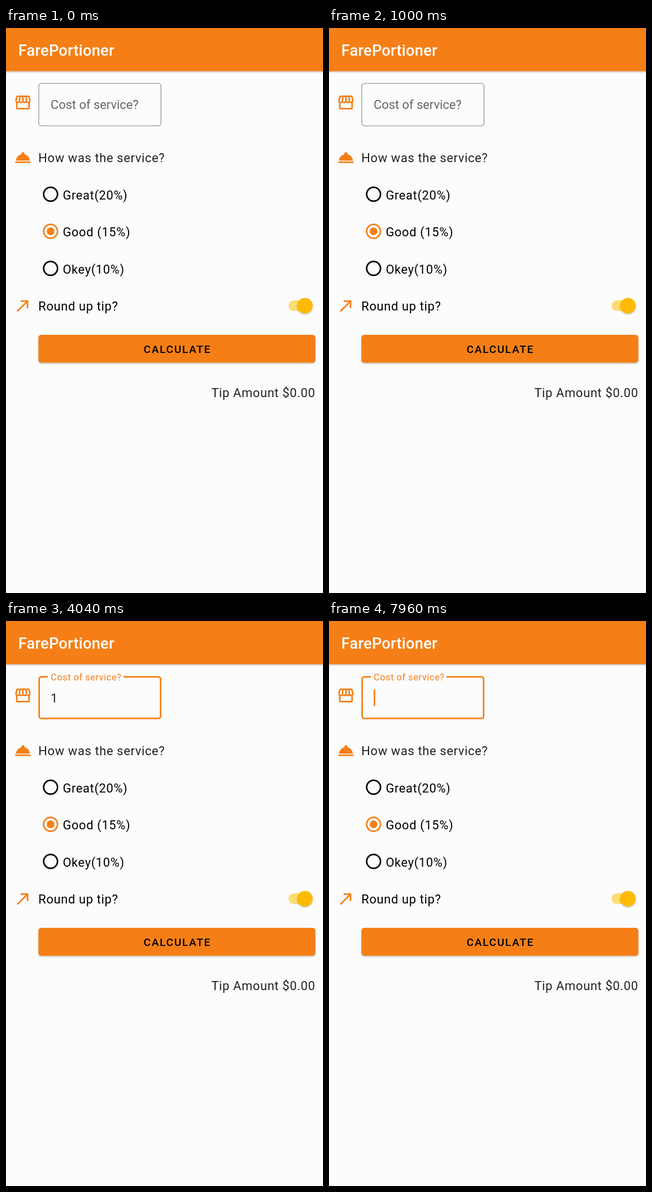
Recreate the animation shown at these times as an HTML page. Size 561x998 px, loop 8 s.

```html
<!DOCTYPE html>
<html lang="en">
<head>
<meta charset="utf-8">
<title>Tip form</title>
<style>
  html, body { margin: 0; width: 100%; height: 100%; overflow: hidden; background: #fcfcfd; }
  svg { display: block; width: 100%; height: 100%; }
  text { font: 400 21.82px Roboto, sans-serif; letter-spacing: .03125em; white-space: pre; }
  .title { font-size: 27.27px; font-weight: 500; letter-spacing: .0075em; fill: #fff; }
  .button { font-size: 19.09px; font-weight: 500; letter-spacing: .0893em; text-anchor: middle; }
  .soft { fill: #212121; }
  .icon { fill: #f57f17; }
  .line { fill: none; stroke: #f57f17; stroke-width: 2; }
</style>
</head>
<body>
<svg viewBox="0 0 561 998" preserveAspectRatio="none">
  <defs>
    <filter id="shadow" x="-20%" y="-20%" width="140%" height="150%">
      <feDropShadow dx="0" dy="1.5" stdDeviation="1.3" flood-color="#000" flood-opacity=".28"/>
    </filter>
  </defs>
  <rect width="561" height="998" fill="#fcfcfd"/>
  <rect x="-9" y="-9" width="579" height="85.3" fill="#f57f17" filter="url(#shadow)"/>
  <text class="title" x="21.8" y="49">FarePortioner</text>

  <g transform="translate(13.6 115.2) scale(1.3636)" class="line">
    <path d="M4 12V19a1 1 0 0 0 1 1H19a1 1 0 0 0 1-1V12"/>
    <path d="M3.07 9.1L4.1 4.75A1 1 0 0 1 5.05 4h13.9a1 1 0 0 1 .95.75L20.93 9.1A2.2 2.2 0 0 1 18.76 12 2.25 2.25 0 0 1 16.5 9.8 2.25 2.25 0 0 1 14.2 12 2.25 2.3 0 0 1 12 9.7 2.25 2.3 0 0 1 9.7 12 2.25 2.25 0 0 1 7.5 9.7 2.25 2.25 0 0 1 5.23 12 2.2 2.2 0 0 1 3.07 9.1ZM8.03 4L7.45 9.7M12 4V9.7M15.97 4l.56 5.7"/>
  </g>
  <path class="icon" transform="translate(13.6 212.5) scale(1.3636)" d="M2 17h20v2H2zm11.84-9.21c.1-.24.16-.51.16-.79a2 2 0 0 0-4 0c0 .28.06.55.16.79C6.25 8.6 3.27 11.93 3 16h18c-.27-4.07-3.25-7.4-7.16-8.21z"/>
  <path class="icon" transform="translate(13.6 474.2) scale(1.3636)" d="M9 5v2h6.59L4 18.59 5.41 20 17 8.41V15h2V5z"/>

  <path id="outline" fill="none"/>
  <text id="hint" x="79.1">Cost of service?</text>
  <text id="amount" class="soft" x="79.1" y="144">1</text>
  <rect id="cursor" y="121" width="2.7" height="29.5" fill="#f57f17"/>

  <text class="soft" x="57.3" y="237">How was the service?</text>
  <g id="options"></g>
  <text x="57.3" y="499">Round up tip?</text>

  <rect x="500" y="481" width="38" height="19" rx="9.5" fill="#fddd73"/>
  <circle cx="529" cy="490.5" r="13.8" fill="#fdba05" filter="url(#shadow)"/>

  <rect x="57.3" y="542" width="490.2" height="49.2" rx="5" fill="#f57f17" filter="url(#shadow)"/>
  <text class="button" x="303.3" y="574">CALCULATE</text>
  <text class="soft" x="363.4" y="651.5">Tip Amount $0.00</text>
</svg>
<script>
const LOOP = 8000, BLINK = 500;
const FOCUS = 3330, FLOAT_TIME = 167, TOUCH = 4920, ERASE = 5950;
const GREY = [101, 101, 104], ORANGE = [245, 127, 23];
const byId = id => document.getElementById(id);
const outline = byId('outline'), hint = byId('hint'), amount = byId('amount'), cursor = byId('cursor');
const lerp = (a, b, p) => a + (b - a) * p;
const mix = (a, b, p) => `rgb(${a.map((v, i) => Math.round(lerp(v, b[i], p)))})`;

function radio(label, y, checked) {
  const color = checked ? '#f57f17' : '#000';
  return `<circle cx="78.9" cy="${y}" r="12.27" fill="none" stroke="${color}" stroke-width="2.73"/>` +
    (checked ? `<circle cx="78.9" cy="${y}" r="6.8" fill="${color}"/>` : '') +
    `<text x="100.4" y="${y + 8.9}">${label}</text>`;
}
byId('options').innerHTML = radio('Great(20%)', 293.6) + radio('Good (15%)', 359.1, true) + radio('Okey(10%)', 424.6);

// cubic-bezier(.4, 0, .2, 1), solved by bisection
function ease(x) {
  if (x <= 0) return 0;
  if (x >= 1) return 1;
  let low = 0, high = 1;
  for (let i = 0; i < 20; i++) {
    const s = (low + high) / 2, r = 1 - s;
    if (1.2 * s * r * r + .6 * s * s * r + s ** 3 < x) low = s; else high = s;
  }
  return 3 * low * low * (1 - low) + low ** 3;
}

function drawOutline(focused) {
  const width = focused ? 2.73 : 1.36, inset = width / 2, r = 5.4 - inset;
  const left = 57.3 + inset, right = 275 - inset, top = 97.2 + inset, bottom = 173.5 - inset;
  const [gapStart, gapEnd] = focused ? [74, 208] : [150, 150];
  const corner = (x, y) => `A${r} ${r} 0 0 1 ${x} ${y}`;
  outline.setAttribute('d', `M${gapEnd} ${top}H${right - r}${corner(right, top + r)}V${bottom - r}` +
    `${corner(right - r, bottom)}H${left + r}${corner(left, bottom - r)}V${top + r}${corner(left + r, top)}H${gapStart}`);
  outline.setAttribute('stroke', focused ? '#f57f17' : '#999');
  outline.setAttribute('stroke-width', width);
}

function render(t) {
  const focused = t >= FOCUS, typed = focused && t < ERASE;
  const rise = ease((t - FOCUS) / FLOAT_TIME), shrink = rise ** 1.3;
  drawOutline(focused);

  hint.setAttribute('y', lerp(143, 105, rise));
  hint.style.fontSize = lerp(21.82, 16.36, shrink) + 'px';
  hint.style.letterSpacing = lerp(0, .0333, shrink) + 'em';
  hint.style.fill = mix(GREY, ORANGE, shrink);

  // Every edit restarts the blinking cursor
  const restart = t >= ERASE ? ERASE : t >= TOUCH ? TOUCH : FOCUS;
  const lit = focused && Math.floor((t - restart) / BLINK) % 2 === 0;
  amount.setAttribute('visibility', typed ? 'visible' : 'hidden');
  cursor.setAttribute('visibility', lit ? 'visible' : 'hidden');
  cursor.setAttribute('x', typed ? 91.1 : 79.1);
}

const start = performance.now();
function tick() {
  render((performance.now() - start) % LOOP);
  requestAnimationFrame(tick);
}
tick();
</script>
</body>
</html>
```
